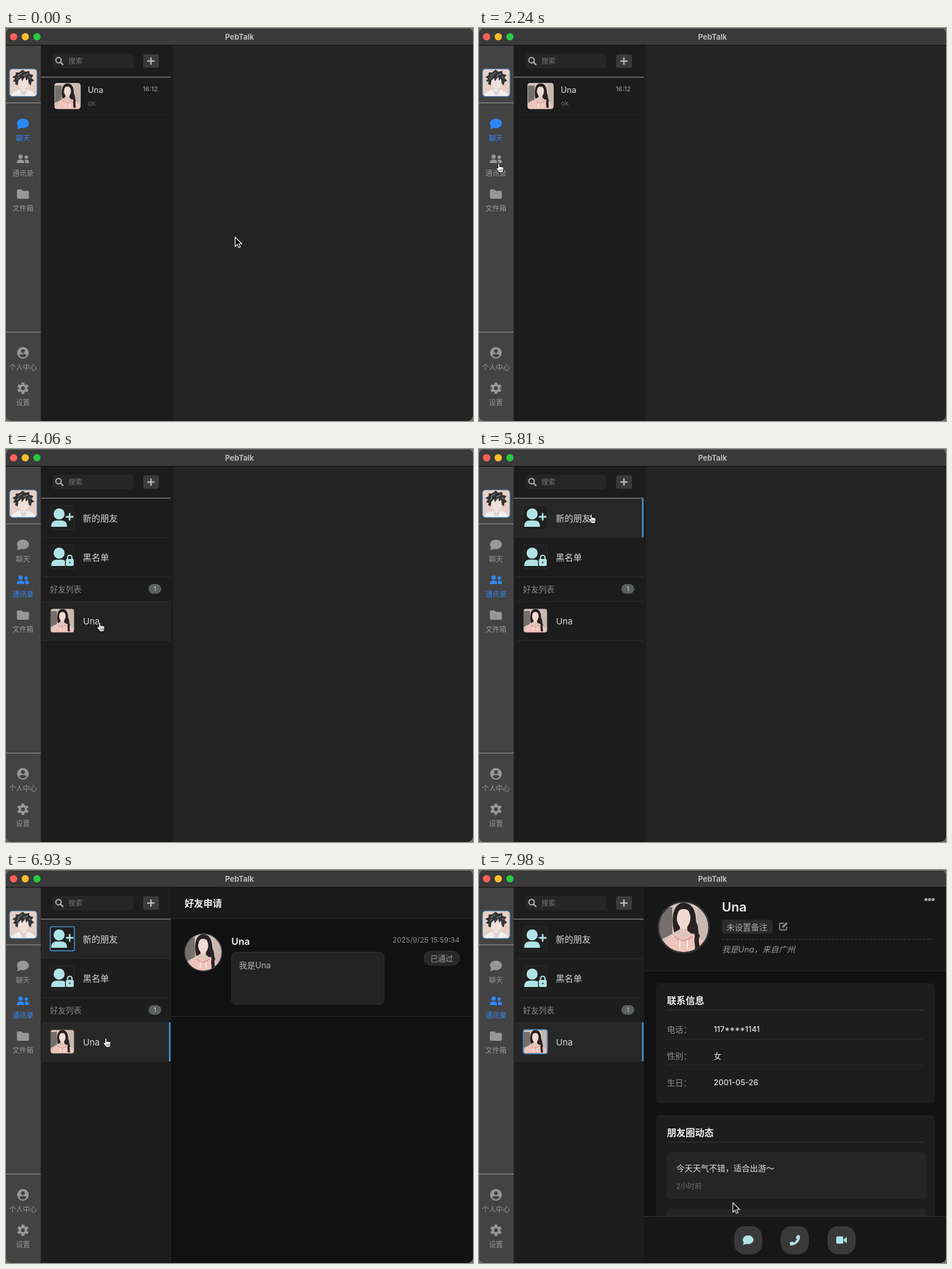
Animation of 800x672 px, one loop 8000 ms. Source, as an HTML page:

```html
<!DOCTYPE html>
<html lang="zh-CN">
<head>
<meta charset="utf-8">
<title>PebTalk</title>
<style>
html, body { margin: 0; width: 100%; height: 100%; overflow: hidden; background: #6a6a6a; }
svg { display: block; }
text {
  font-family: Inter, "Noto Sans CJK SC", "Noto Sans CJK", sans-serif;
  dominant-baseline: central;
}
.mid { text-anchor: middle; }
.end { text-anchor: end; }
.s11 { font-size: 11px; } .s12 { font-size: 12px; } .s13 { font-size: 13px; }
.s14 { font-size: 14px; } .s15 { font-size: 15px; } .s16 { font-size: 16px; }
.med { font-weight: 500; } .semi { font-weight: 600; } .bold { font-weight: 700; }
.nav { fill: currentColor; color: #979797; }
.pale { fill: #b0e3e6; }
.line { fill: none; stroke: #2b2b2b; }
.ring { fill: none; stroke: #4385bd; stroke-width: 1.8; }
.bar { fill: #4385bd; }
.hl { fill: #272727; }

.nav, .chat, .contacts, .detail, .requests, .profile,
.hl, .bar, .ring, .cursor, .arrow, .hand { animation: 8s linear infinite; }

.chat, .contacts, .detail, .requests, .profile, .bar, .arrow, .hand {
  animation-timing-function: step-end;
}
.chat { animation-name: chat; }
.contacts { animation-name: contacts; }
.detail { animation-name: detail; }
.requests { animation-name: requests; }
.profile { animation-name: profile; }
@keyframes chat { 0% { opacity: 1 } 34.125%, 100% { opacity: 0 } }
@keyframes contacts { 0% { opacity: 0 } 34.125%, 100% { opacity: 1 } }
@keyframes detail { 0% { opacity: 0 } 73.5%, 100% { opacity: 1 } }
@keyframes requests { 0% { opacity: 0 } 73.5% { opacity: 1 } 87.5%, 100% { opacity: 0 } }
@keyframes profile { 0% { opacity: 0 } 87.5%, 100% { opacity: 1 } }

.tab-chat { animation-name: tab-chat; }
.tab-people { animation-name: tab-people; }
@keyframes tab-chat { 0%, 34.1% { color: #2e87f8 } 35.5%, 100% { color: #979797 } }
@keyframes tab-people { 0%, 34.1% { color: #979797 } 35.5%, 100% { color: #2e87f8 } }

.hl.new { animation-name: hl-new; }
.hl.block { animation-name: hl-block; }
.hl.friend { animation-name: hl-friend; }
@keyframes hl-new { 0%, 67.7% { opacity: 0 } 70.2%, 86.6% { opacity: 1 } 89.2%, 100% { opacity: 0 } }
@keyframes hl-block {
  0%, 66.1% { opacity: 0 } 67.7% { opacity: .6 } 70%, 79.6% { opacity: 0 }
  81.4% { opacity: .6 } 83.5%, 100% { opacity: 0 }
}
@keyframes hl-friend {
  0%, 42% { opacity: 0 } 44.5%, 64.9% { opacity: .7 } 67.4%, 82.5% { opacity: 0 }
  84.9%, 100% { opacity: 1 }
}
.bar.new { animation-name: bar-new; }
.bar.friend { animation-name: bar-friend; }
@keyframes bar-new { 0% { opacity: 0 } 72.625% { opacity: 1 } 86.625%, 100% { opacity: 0 } }
@keyframes bar-friend { 0% { opacity: 0 } 86.625%, 100% { opacity: 1 } }
.ring.new { animation-name: ring-new; }
.ring.friend { animation-name: ring-friend; }
@keyframes ring-new { 0%, 73.5% { opacity: 0 } 75.3%, 86.7% { opacity: 1 } 89.2%, 100% { opacity: 0 } }
@keyframes ring-friend { 0%, 86.7% { opacity: 0 } 89.2%, 100% { opacity: 1 } }

.cursor { animation-name: move; animation-timing-function: ease-in-out; }
@keyframes move {
  0%, 17.5% { transform: translate(392px, 357px) }
  28%, 38.5% { transform: translate(34px, 231px) }
  46.375%, 62.125% { transform: translate(160.5px, 296px) }
  70.875%, 77% { transform: translate(192px, 111px) }
  84.875%, 88.4% { transform: translate(171px, 287px) }
  96.25%, 100% { transform: translate(434.5px, 568.5px) }
}
.arrow { animation-name: arrow; }
.hand { animation-name: hand; }
@keyframes arrow {
  0% { opacity: 1 } 25.5% { opacity: 0 } 41.1% { opacity: 1 } 42.1% { opacity: 0 }
  64.9% { opacity: 1 } 66.1% { opacity: 0 } 81.4% { opacity: 1 } 82.5% { opacity: 0 }
  90.6%, 100% { opacity: 1 }
}
@keyframes hand {
  0% { opacity: 0 } 25.5% { opacity: 1 } 41.1% { opacity: 0 } 42.1% { opacity: 1 }
  64.9% { opacity: 0 } 66.1% { opacity: 1 } 81.4% { opacity: 0 } 82.5% { opacity: 1 }
  90.6%, 100% { opacity: 0 }
}
</style>
</head>
<body>
<svg width="800" height="672" viewBox="0 0 800 672">
<defs>
  <clipPath id="win"><rect width="800" height="672" rx="10"/></clipPath>
  <clipPath id="sq"><rect width="40" height="40" rx="4"/></clipPath>
  <clipPath id="round"><circle cx="20" cy="20" r="20"/></clipPath>
  <clipPath id="scroll"><rect x="283" y="173" width="517" height="419"/></clipPath>

  <g id="girl">
    <rect width="40" height="40" fill="#d3c3bc"/>
    <path d="M0 4H11V25L0 31z" fill="#766e6b"/>
    <path d="M31 0H40V30H31z" fill="#c9b8b0"/>
    <path d="M12.500 24C10 14 11 1 20 .5C29 1 31 10 29.500 25H26L20 20z" fill="#272123"/>
    <path d="M1 40C3 31 8 28 14 25L20 28L27 25C33 28 37 32 39 40z" fill="#efc4bb"/>
    <path d="M17 17H23V25L20 29L17 25z" fill="#e3c4b7"/>
    <path d="M14.500 10C15 4 25 4 25.500 10C26 16 23.500 20 20 22C16.500 20 14 16 14.500 10z" fill="#f0dad1"/>
    <path d="M20 3C16 5 15 9 14 16C12 10 14 3 20 2.500C26 3 28 10 26 16C25.500 9 24 5 20 3z" fill="#272123"/>
    <path d="M13 27Q19 34 27 27" fill="none" stroke="#d7a29b" stroke-width="1.400"/>
    <path d="M17 30V37M23 30V37" stroke="#fbeae4"/>
    <path d="M28 16C31 20 29 24 31 27C29 31 32 34 30.500 38" fill="none" stroke="#2a2426" stroke-width="3.600"/>
  </g>
  <g id="boy">
    <rect width="40" height="40" fill="#e6d0c7"/>
    <path d="M2 40C4 33 10 32 15 30H26C31 32 36 33 38 40z" fill="#f1f0ef"/>
    <path d="M12 14H28L27 25L20 32L13 25z" fill="#efe2dc"/>
    <path d="M15 29L20 33L26 29L23 38H18z" fill="#dfd3ce"/>
    <path d="M12 24L8 22L9 19L5 18L8 14L4 12L9 9L9 5L14 5L19 1L23 4L29 3L29 7L35 9L32 13L36 17L32 19L31 24L28 21L27 14L24 17L23 11L18 18L17 13L13 17z" fill="#333335"/>
    <path d="M12 10L19 5M20 10L27 7M11 15L14 11M28 11L31 13" stroke="#8b8c8e"/>
  </g>

  <g id="bubble"><ellipse cy="-.8" rx="10.300" ry="8.300"/><path d="M-8.500 2Q-8 6-10.300 8.300Q-6 9-2 6z"/></g>
  <g id="people">
    <circle cx="-4" cy="-4" r="3.700"/>
    <path d="M-10.300 7V5C-10.300 2-7.500 1-4 1S2 2 2 5V7z"/>
    <circle cx="5.700" cy="-3.300" r="3"/>
    <path d="M3.800 7H10.300V4.800C10.300 2 8 1 5.500 1Q4 1 2.800 1.400Q4 3 3.800 7z"/>
  </g>
  <path id="folder" d="M-8.300-8H-2.500L0-5.500H8.300Q10.300-5.500 10.300-3.500V6Q10.300 8 8.300 8H-8.300Q-10.300 8-10.300 6V-6Q-10.300-8-8.300-8z"/>
  <g id="user"><circle cx="91" cy="111" r="9.500"/><path d="M77.500 133V131Q78 122.300 87 122.300H95Q104 122.300 104.500 131V133z"/></g>
  <rect id="box" x="76" y="97" width="41" height="41" rx="3" fill="#1f1f1f" stroke="#2d2d2d"/>
</defs>

<g clip-path="url(#win)">
  <rect width="800" height="672" fill="#232323"/>
  <rect x="60" y="30" width="226" height="642" fill="#1c1c1c"/>
  <rect class="detail" x="60" y="30" width="222.500" height="642" fill="#1d1d1d"/>

  <!-- title bar -->
  <rect width="800" height="29" fill="#3a3a3a"/>
  <path d="M0 .5H800" stroke="#757575"/>
  <path d="M0 29.500H800" stroke="#0d0d0d"/>
  <circle cx="13" cy="15" r="6.200" fill="#ff5f57"/>
  <circle cx="33" cy="15" r="6.200" fill="#febc2e"/>
  <circle cx="53" cy="15" r="6.200" fill="#28c840"/>
  <text class="mid s13 bold" x="400" y="14.500" fill="#b9b9b9">PebTalk</text>

  <!-- sidebar -->
  <rect y="30" width="59.500" height="642" fill="#434343"/>
  <path d="M0 128H59.500M0 520H59.500" stroke="#a5a5a5" stroke-width="1.200"/>
  <use href="#boy" clip-path="url(#sq)" transform="translate(6 70) scale(1.175)"/>
  <rect class="ring" x="6" y="70" width="47" height="47" rx="5" style="stroke-width:1.200"/>
  <g class="nav tab-chat">
    <use href="#bubble" x="29" y="164"/>
    <text class="mid s12" x="29" y="188">聊天</text>
  </g>
  <g class="nav tab-people">
    <use href="#people" x="29" y="224"/>
    <text class="mid s12" x="29" y="248">通讯录</text>
  </g>
  <g class="nav">
    <use href="#folder" x="29" y="284"/>
    <text class="mid s12" x="29" y="308">文件箱</text>
    <circle cx="29" cy="555.500" r="10"/>
    <g fill="#434343"><circle cx="29" cy="552.500" r="3.300"/><path d="M22.800 560.500Q24 557.500 27 557.500H31Q34 557.500 35.200 560.500Q29 566 22.800 560.500z"/></g>
    <text class="mid s12" x="29" y="580">个人中心</text>
    <g transform="translate(29 616)">
      <circle r="7.200"/>
      <path d="M0-9.800V9.800M-8.500-4.900L8.500 4.900M-8.500 4.900L8.500-4.900" stroke="currentColor" stroke-width="5"/>
      <circle r="3.200" fill="#434343"/>
    </g>
    <text class="mid s12" x="29" y="640">设置</text>
  </g>

  <!-- search -->
  <rect x="80" y="44" width="138" height="25" rx="5" fill="#262626"/>
  <circle cx="90" cy="55" r="4.600" fill="none" stroke="#aaa" stroke-width="2.200"/>
  <path d="M93.500 58.500L97.300 62.300" stroke="#aaa" stroke-width="2.600" stroke-linecap="round"/>
  <text class="s12" x="107" y="56.500" fill="#757575">搜索</text>
  <rect x="235" y="45" width="27" height="23" rx="3" fill="#3a3a3a"/>
  <path d="M243 56.500H253.500M248.300 51.200V61.800" stroke="#b4b4b4" stroke-width="2.600" stroke-linecap="round"/>

  <!-- chat list -->
  <g class="chat">
    <path class="line" d="M66 148.500H282" stroke-opacity=".6"/>
    <use href="#girl" clip-path="url(#sq)" transform="translate(83 94) scale(1.115)"/>
    <rect x="83.500" y="94.500" width="44" height="43.500" rx="5" fill="none" stroke="#d8cfca" stroke-opacity=".7"/>
    <text class="s14 med" x="140" y="105" fill="#c4c4c4">Una</text>
    <text class="s11 end" x="260" y="104" fill="#a8a8a8">16:12</text>
    <text class="s12" x="140" y="128.500" fill="#686868">ok</text>
  </g>

  <!-- contact list -->
  <g class="contacts">
    <rect class="hl new" x="61" y="84" width="221" height="68"/>
    <rect class="hl block" x="61" y="151" width="221" height="68"/>
    <rect class="hl friend" x="61" y="260" width="221" height="68"/>
    <path class="line" d="M64 151.500H282M64 218.500H282M64 260.500H282M64 327.500H282"/>
    <use href="#box"/>
    <use href="#box" y="67"/>
    <rect class="ring new" x="75.800" y="96.800" width="41.400" height="41.400" rx="3"/>
    <g class="pale">
      <use href="#user"/>
      <path d="M102.500 116H115.500M109 109.500V122.500" stroke="#b0e3e6" stroke-width="2.800"/>
      <use href="#user" y="67"/>
      <rect x="101" y="186" width="16" height="15" rx="3" fill="#1f1f1f"/>
      <rect x="102.500" y="188" width="13.500" height="12" rx="2"/>
      <path d="M105.500 189V185.500A3.700 3.700 0 0 1 113 185.500V189" fill="none" stroke="#b0e3e6" stroke-width="2.200"/>
      <circle cx="109.200" cy="194" r="1.300" fill="#333"/>
    </g>
    <g class="s15" fill="#d8d8d8">
      <text x="131.500" y="118">新的朋友</text>
      <text x="131.500" y="185">黑名单</text>
      <text x="132" y="294">Una</text>
    </g>
    <text x="75.500" y="239.500" font-size="13.400" fill="#888">好友列表</text>
    <rect x="244" y="231" width="22" height="16.500" rx="8.200" fill="#5b5f60"/>
    <text class="mid s11" x="255" y="239.300" fill="#ccc">1</text>
    <use href="#girl" clip-path="url(#sq)" transform="translate(76 273) scale(1.025)"/>
    <rect x="76" y="273" width="41" height="41" rx="4" fill="none" stroke="#333"/>
    <rect class="ring friend" x="75.800" y="272.800" width="41.400" height="41.400" rx="4"/>
    <rect class="bar new" x="279" y="84" width="3" height="67"/>
    <rect class="bar friend" x="279" y="260.500" width="3" height="66.500"/>
  </g>
  <path d="M60 84H282" stroke="#7c7c7c" stroke-width="1.300"/>

  <!-- friend requests -->
  <g class="requests">
    <rect x="283" y="30" width="517" height="642" fill="#111"/>
    <rect x="283" y="30" width="517" height="53" fill="#1a1a1a"/>
    <path class="line" d="M283 83.500H800M283 250.500H800"/>
    <text class="s16 bold" x="306" y="56.500" fill="#f0f0f0">好友申请</text>
    <use href="#girl" clip-path="url(#round)" transform="translate(306 109) scale(1.590)"/>
    <circle cx="338" cy="140.800" r="31.800" fill="none" stroke="#48494a" stroke-width="1.600"/>
    <text class="semi" x="386" y="122" font-size="16.500" fill="#eee">Una</text>
    <text class="end" x="777" y="119" font-size="12.300" fill="#8c8c8c">2025/9/25 15:59:34</text>
    <rect x="386.500" y="140.500" width="261" height="89.500" rx="7" fill="#232323" stroke="#2f2f2f"/>
    <text class="s14" x="399" y="162" fill="#b2b2b2">我是Una</text>
    <rect x="716" y="138.500" width="61" height="24.500" rx="12" fill="#292929" stroke="#303030"/>
    <text class="mid s13" x="746.500" y="151" fill="#9c9c9c">已通过</text>
  </g>

  <!-- friend profile -->
  <g class="profile">
    <rect x="283" y="30" width="517" height="642" fill="#111"/>
    <rect x="283" y="30" width="517" height="142" fill="#171717"/>
    <path class="line" d="M283 172.500H800"/>
    <use href="#girl" clip-path="url(#round)" transform="translate(307.500 55) scale(2.150)"/>
    <circle cx="350.500" cy="98" r="43.500" fill="none" stroke="#2f3234" stroke-width="2.600"/>
    <text class="semi" x="416" y="63" font-size="22" fill="#eee">Una</text>
    <rect x="416" y="85" width="87" height="24" rx="5" fill="#2a2a2a"/>
    <text class="s14" x="424" y="97" fill="#aaa">未设置备注</text>
    <g fill="none" stroke="#8a8a8a" stroke-width="1.800">
      <path d="M522 91H516.500Q515 91 515 92.500V101Q515 102.500 516.500 102.500H525.500Q527 102.500 527 101V97"/>
      <path d="M520 98L527.500 90.500" stroke-width="3.600"/>
    </g>
    <path d="M416 118.500H777" stroke="#474747" stroke-dasharray="4 2.500"/>
    <text class="s14" x="416" y="135.500" fill="#999" font-style="italic">我是Una，来自广州</text>
    <g fill="#aaa"><circle cx="765.700" cy="50.500" r="2.600"/><circle cx="771.800" cy="50.500" r="2.600"/><circle cx="777.900" cy="50.500" r="2.600"/></g>

    <g clip-path="url(#scroll)">
      <g fill="#1d1d1d">
        <rect x="303" y="194" width="478" height="205" rx="7"/>
        <rect x="303" y="419" width="478" height="205" rx="7"/>
      </g>
      <path class="line" d="M322 289.500H762M322 333.500H762"/>
      <path d="M322 239.500H762M322 465.500H762" stroke="#343434"/>
      <g class="s16 bold" fill="#eee">
        <text x="322" y="222.500">联系信息</text>
        <text x="322" y="448.500">朋友圈动态</text>
      </g>
      <g class="s14" fill="#8c8c8c">
        <text x="322" y="272">电话：</text>
        <text x="322" y="317.500">性别：</text>
        <text x="322" y="363">生日：</text>
      </g>
      <g class="med" font-size="13.400" fill="#e2e2e2">
        <text x="402" y="272">117****1141</text>
        <text x="402" y="317.500">女</text>
        <text x="402" y="363">2001-05-26</text>
      </g>
      <rect x="322" y="483" width="444" height="80" rx="6" fill="#252525"/>
      <rect x="322" y="579" width="444" height="80" rx="6" fill="#252525"/>
      <text class="s14 med" x="338" y="509.500" fill="#e0e0e0">今天天气不错，适合出游～</text>
      <text class="s12" x="338" y="540" fill="#6c6c6c">2小时前</text>
    </g>

    <rect x="283" y="592" width="517" height="80" fill="#171717"/>
    <path d="M283 592.500H800" stroke="#333"/>
    <g fill="#393939">
      <rect x="437" y="609" width="48" height="48" rx="18"/>
      <rect x="517" y="609" width="48" height="48" rx="18"/>
      <rect x="597" y="609" width="48" height="48" rx="18"/>
    </g>
    <g class="pale">
      <use href="#bubble" transform="translate(461 633) scale(.9)"/>
      <path d="M545.500 624.500L549.500 625.500Q550 639.500 534 642L532.500 637.500L537 635.500L539 637.800Q543.500 635.500 545.300 631L543 629.200z" stroke="#b0e3e6" stroke-linejoin="round"/>
      <rect x="612" y="626.500" width="12" height="12.500" rx="2"/>
      <path d="M625 631L630 627.500V638L625 634.500z"/>
    </g>
  </g>

  <g class="cursor">
    <path class="arrow" d="M.5 .5V16.500L4.200 13L6.500 18.500L9.300 17.300L7 12H11.800z" fill="#000" stroke="#fff" stroke-width="1.200"/>
    <g class="hand" stroke="#000">
      <path d="M-1.400 8.500V1.900A1.400 1.400 0 0 1 1.400 1.900V6.500C1.700 5.300 3.600 5.400 3.800 6.700C4.300 5.800 5.800 5.900 6 7.200C6.600 6.400 8 6.700 8 8.100V11.500C8 13.200 6.900 14.100 6.700 16.100H.5C0 13.800-2.800 12-4.100 9.900C-4.800 8.700-3.300 7.600-2.200 8.700z" fill="#fff"/>
      <path d="M1.500 10.500V13.500M3.600 10.500V13.500M5.700 10.500V13.500" stroke-width=".8"/>
    </g>
  </g>
</g>
</svg>
</body>
</html>
```
